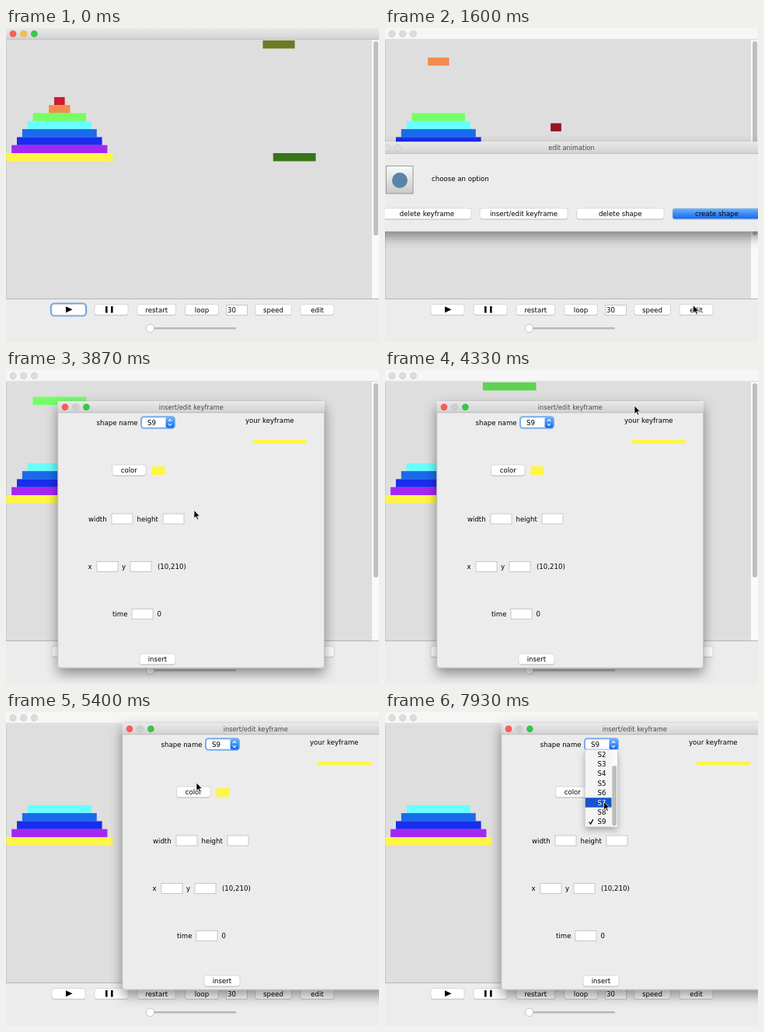
An HTML page for the animation above (8000 ms loop, 480x404 px).

```html
<!DOCTYPE html>
<html lang="en">
<head>
<meta charset="utf-8">
<title>Tower animation editor</title>
<style>
  html, body { margin: 0; width: 100%; height: 100%; overflow: hidden; background: #ececec; }
  svg { display: block; width: 100%; height: 100%; }
  text { font: 8.6px "DejaVu Sans", Verdana, sans-serif; white-space: pre; }
</style>
</head>
<body>
<svg id="stage" viewBox="0 0 480 404"></svg>
<script>
const LOOP = 8000;
const stage = document.getElementById('stage');

// ---- markup helpers ----
const rect = (x, y, w, h, fill, extra = '') =>
  `<rect x="${x}" y="${y}" width="${w}" height="${h}" fill="${fill}" ${extra}/>`;
const label = (x, yMid, text, anchor = 'start', extra = '') =>
  `<text x="${x}" y="${yMid + 3.1}" text-anchor="${anchor}" ${extra}>${text}</text>`;
const button = (x, y, w, text = '', fill = '#fff') =>
  rect(x, y + .6, w, 14, '#b5b5b5', 'rx="3"') +
  rect(x, y, w, 13.8, fill, 'rx="3" stroke="#c6c6c6" stroke-width=".6"') +
  label(x + w / 2, y + 7, text, 'middle');
const field = (x, y, w = 27) =>
  rect(x + .5, y + .5, w, 13, '#fff', 'stroke="#bdbdbd" stroke-width=".8"');
const dots = (x, y, colors) => colors.map((c, i) =>
  `<circle cx="${x + i * 13.7}" cy="${y}" r="4.2" fill="${c}" stroke="#000" stroke-opacity=".13" stroke-width=".6"/>`).join('');
const titleBar = (x, y, w, text) =>
  rect(x, y, w, 15, 'url(#bar)') + rect(x, y + 14.4, w, .8, '#b4b4b4') +
  label(x + w / 2, y + 7.8, text, 'middle', 'fill="#484848" style="font-size:8.2px"');

const RED = '#fc5b57', AMBER = '#fdbc40', GREEN = '#34c84a', GREY = '#dcdcdc', YELLOW = '#fff546';

const defs = `<defs>
  <linearGradient id="bar" x2="0" y2="1"><stop stop-color="#e9e9e9"/><stop offset="1" stop-color="#d2d2d2"/></linearGradient>
  <linearGradient id="blue" x2="0" y2="1"><stop stop-color="#6cb3fa"/><stop offset="1" stop-color="#1268f0"/></linearGradient>
  <linearGradient id="tile" x2="0" y2="1"><stop stop-color="#fafafa"/><stop offset="1" stop-color="#c9c9c9"/></linearGradient>
  <filter id="shadow" x="-20%" y="-20%" width="140%" height="150%">
    <feDropShadow dx="0" dy="7" stdDeviation="8" flood-opacity=".42"/></filter>
  <filter id="soft" x="-30%" y="-20%" width="160%" height="150%">
    <feDropShadow dx="0" dy="4" stdDeviation="4" flood-opacity=".3"/></filter>
</defs>`;

const mainWindow =
  rect(0, 0, 480, 404, '#ececec') +
  `<g id="active">${titleBar(0, 0, 480, '')}${dots(9, 7.5, [RED, AMBER, GREEN])}</g>` +
  `<g id="inactive">${rect(0, 0, 480, 15, '#f6f6f6')}${rect(0, 14.4, 480, .8, '#cfcfcf')}${dots(9, 7.5, [GREY, GREY, GREY])}</g>` +
  rect(0, 15.4, 471, 333, '#dedede') + rect(0, 15.4, .8, 333, '#c4c4c4') +
  rect(471, 15.4, 9, 333, '#fafafa') + rect(473, 17, 6, 250, '#bfbfbf', 'rx="3"') +
  '<g id="disks"></g>' +
  rect(0, 348, 480, .9, '#b0b0b0') +
  rect(58, 354.6, 45, 15.4, 'none', 'id="focus" rx="4" stroke="#6fa8e8" stroke-width="2.4"') +
  button(59, 355.5, 43) + '<path d="M77 358.3 85.5 362.3 77 366.3z"/>' +
  button(114, 355.5, 43) + rect(128, 358, 2.6, 8.5, '#000') + rect(135, 358, 2.6, 8.5, '#000') +
  button(169, 355.5, 49.5, 'restart') + button(230.5, 355.5, 43, 'loop') +
  field(283, 356) + label(285, 363, '30') +
  button(320.5, 355.5, 47, 'speed') + button(379, 355.5, 43, 'edit') +
  rect(185, 385.3, 111, 2.2, '#b3b3b3', 'rx="1"') +
  '<circle cx="185.5" cy="386.4" r="5.2" fill="#fff" stroke="#b5b5b5" stroke-width=".8"/>';

const optionDialog = `<g id="options">
  ${rect(-20, 146.5, 520, 115, '#ececec', 'rx="4" filter="url(#shadow)"')}
  ${titleBar(-20, 146.5, 520, 'edit animation')}
  ${dots(-11, 154.5, [RED, GREY, GREY])}
  ${rect(1.5, 177.5, 34.5, 35.5, 'url(#tile)', 'stroke="#909090" stroke-width=".9"')}
  <circle cx="19" cy="196" r="10" fill="#5b83a6"/>
  ${label(60, 194, 'choose an option')}
  ${button(-3, 232, 114, 'delete keyframe')}
  ${button(122, 232, 113, 'insert/edit keyframe')}
  ${button(246.5, 232, 112.5, 'delete shape')}
  ${button(370, 232, 114, 'create shape', 'url(#blue)')}
</g>`;

// Coordinates inside this dialog are relative to its top left corner.
const keyframeDialog = `<g id="editor">
  ${rect(0, 0, 343.5, 343.5, '#ececec', 'rx="4" filter="url(#shadow)"')}
  ${rect(.2, .2, 343, 343, 'none', 'rx="4" stroke="#a8a8a8" stroke-width=".7"')}
  ${titleBar(0, 0, 343.5, 'insert/edit keyframe')}
  ${dots(9.5, 7.8, [RED, '#cfcfcf', GREEN])}
  ${label(50, 28, 'shape name')}
  ${rect(107.5, 20.3, 43, 14.4, '#fff', 'rx="3.5" stroke="#79aeea" stroke-width="2"')}
  ${rect(139, 20.6, 11, 13.8, 'url(#blue)', 'rx="3"')}
  <path d="M142.4 26.2l2.1-2.6 2.1 2.6M142.4 29l2.1 2.6 2.1-2.6" fill="none" stroke="#fff" stroke-width="1.1"/>
  ${label(121, 27.8, 'S9', 'middle')}
  ${label(241.5, 24.8, 'your keyframe')}
  ${rect(251.2, 50, 69, 4.6, YELLOW)}
  ${button(70, 82, 43.5, 'color')} ${rect(121, 84, 17, 11, YELLOW)}
  ${label(39.5, 151.8, 'width')} ${field(69, 144.5)} ${label(102, 151.8, 'height')} ${field(135, 144.5)}
  ${label(39, 212.8, 'x')} ${field(50, 206)} ${label(82.5, 212.8, 'y')} ${field(93, 206)} ${label(128.5, 212.8, '(10,210)')}
  ${label(70.5, 274, 'time')} ${field(95, 267)} ${label(128, 274, '0')}
  ${button(105.5, 325, 46, 'insert')}
</g>`;

const ITEM_H = 12.4, FIRST_ITEM = 54.5;
const itemMid = n => FIRST_ITEM + (n - 2) * ITEM_H;
const items = [2, 3, 4, 5, 6, 7, 8, 9];
const popup = `<g id="popup">
  ${rect(257.5, 48.3, 41.5, 99.5, '#f5f5f5', 'filter="url(#soft)"')}
  ${rect(257.5, 48.3, 41.5, 99.5, 'none', 'stroke="#c8c8c8" stroke-width=".6"')}
  ${rect(291.5, 48.6, 7.3, 99, '#fafafa')} ${rect(292.2, 69, 5.8, 77.5, '#bdbdbd', 'rx="2.9"')}
  ${rect(257.8, 0, 33.7, ITEM_H, '#1555cd', 'id="highlight"')}
  ${items.map(n => label(273.5, itemMid(n), 'S' + n, 'start', 'class="item"')).join('')}
  <path id="check" d="M262.8 141.5l1.8 2.6 3.2-6" fill="none" stroke-width="1.3"/>
</g>`;

const pointer = `<path id="pointer" d="M0 0V10.4L2.4 8.2 4.2 12 5.8 11.2 4.1 7.6H7.4Z" stroke="#fff" stroke-width=".7"/>`;

stage.innerHTML = defs + mainWindow + optionDialog + keyframeDialog + popup + pointer;
const el = id => document.getElementById(id);
const itemTexts = [...stage.querySelectorAll('.item')];

// ---- motion helpers ----
const clamp = v => Math.max(0, Math.min(1, v));
const mix = (a, b, p) => a + (b - a) * p;
const smooth = p => p * p * (3 - 2 * p);
// Interpolates keys of the form [time, ...values].
function track(keys, t, ease = p => p) {
  let i = 0;
  while (i < keys.length - 2 && t >= keys[i + 1][0]) i++;
  const [a, b] = [keys[i], keys[i + 1]];
  const p = ease(clamp((t - a[0]) / (b[0] - a[0])));
  return a.slice(1).map((v, n) => mix(v, b[n + 1], p));
}

// ---- the towers ----
const TOP = 16, ROW = 10.3;
const SHADE = [1, .71, .46];
const COLORS = [[207, 28, 46], [242, 140, 78], [225, 245, 76], [120, 255, 54], [115, 255, 100],
  [105, 255, 255], [25, 107, 236], [25, 45, 236], [165, 40, 240], [255, 245, 70]];
const pegX = peg => 68.8 + 151.2 * peg;
const rowY = row => 161 - ROW * row;

const pegs = [[9, 8, 7, 6, 5, 4, 1, 0], [2], [3]];
const home = [];
pegs.forEach((stack, peg) => stack.forEach((disk, row) => home[disk] = { peg, row }));

// Each move is [disk, from, to]; a disk rises while the one before it falls.
const moves = [[2, 1, 2], [0, 0, 1], [1, 0, 2], [0, 1, 2], [4, 0, 1], [0, 2, 0], [1, 2, 1], [0, 0, 1], [2, 2, 0]]
  .map(([disk, from, to], k) => {
    const rowFrom = pegs[from].length - 1;
    pegs[from].pop();
    const rowTo = pegs[to].push(disk) - 1;
    return { disk, from, to, rowFrom, rowTo, start: 2 * k - 1 };
  });

const phaseKeys = [[0, .865], [1600, 3.733], [2800, 5.932], [4330, 8.603], [8000, 15.16]];

el('disks').innerHTML = COLORS.map((_, i) => rect(0, 0, 13.7 * (i + 1), 10.4, '#000')).join('');
const diskEls = [...el('disks').children];

function drawDisks(t) {
  const [phase] = track(phaseKeys, t);
  const poses = home.map(({ peg, row }) => ({ x: pegX(peg), y: rowY(row), shade: SHADE[peg] }));
  for (const m of moves) {
    const v = phase - m.start;
    if (v <= 0) continue;
    const across = clamp(v - 1);
    poses[m.disk] = {
      x: mix(pegX(m.from), pegX(m.to), across),
      y: v < 2 ? mix(rowY(m.rowFrom), TOP, clamp(v)) : mix(TOP, rowY(m.rowTo), clamp(v - 2)),
      shade: mix(SHADE[m.from], SHADE[m.to], across)
    };
  }
  poses.forEach((p, i) => {
    diskEls[i].setAttribute('transform', `translate(${p.x - 6.85 * (i + 1)} ${p.y})`);
    diskEls[i].setAttribute('fill', `rgb(${COLORS[i].map(c => Math.round(c * p.shade))})`);
  });
}

// ---- windows and pointer ----
const pointerKeys = [[0, 400, 412], [450, 400, 412], [900, 396.5, 356.5], [1750, 396.5, 356.5],
  [2500, 207, 240], [3650, 207, 240], [4250, 321, 46], [4450, 321, 46], [5050, 404, 20],
  [5270, 309, 52], [5400, 245, 91], [5950, 282, 41.5], [6450, 282, 41.5], [7600, 281.5, 115.5], [8000, 281.5, 115.5]];
const OPTIONS = [1250, 2700], EDITOR = 3600, POPUP = 6200;
const show = (id, on) => el(id).setAttribute('display', on ? 'inline' : 'none');

function draw(t) {
  const optionsOpen = t >= OPTIONS[0] && t < OPTIONS[1];
  const editorOpen = t >= EDITOR;
  show('active', !optionsOpen && !editorOpen);
  show('inactive', optionsOpen || editorOpen);
  show('focus', t < OPTIONS[0]);
  show('options', optionsOpen);
  show('editor', editorOpen);
  show('popup', t >= POPUP);
  drawDisks(t);

  const [x, y] = track(pointerKeys, t, smooth);
  el('pointer').setAttribute('transform', `translate(${x} ${y})`);

  const drag = t < 4450 ? 0 : t < 5050 ? (x - 321) / 83 : 1;
  el('editor').setAttribute('transform', `translate(${66.5 + 83 * drag} ${40 - 26 * drag})`);

  const hovered = y < 48.5 ? 9 : Math.min(9, Math.round((y - FIRST_ITEM) / ITEM_H) + 2);
  el('highlight').setAttribute('y', itemMid(hovered) - ITEM_H / 2);
  itemTexts.forEach((text, i) => text.setAttribute('fill', items[i] === hovered ? '#fff' : '#000'));
  el('check').setAttribute('stroke', hovered === 9 ? '#fff' : '#000');
}

const begin = performance.now();
function tick() {
  draw((performance.now() - begin) % LOOP);
  requestAnimationFrame(tick);
}
tick();
</script>
</body>
</html>
```
